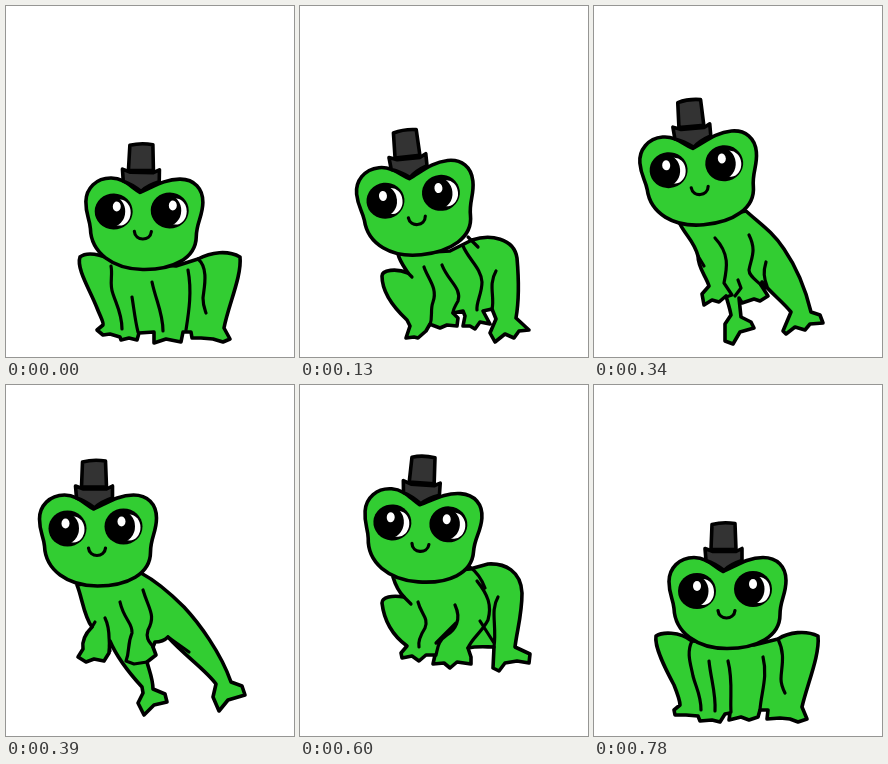
An HTML page that plays this animation: 288 px wide and 351 px high, repeating every 0.91 s.

```html
<!DOCTYPE html>
<html lang="en">
<head>
<meta charset="utf-8">
<title>Hopping frog</title>
<style>
  html, body { margin: 0; width: 100%; height: 100%; overflow: hidden; background: #fff; }
  svg { display: block; width: 288px; height: 351px; }
  path { stroke: #000; stroke-width: 3.6; stroke-linejoin: round; stroke-linecap: round; }
  .skin { fill: #32cd32; }
  .line { fill: none; stroke-width: 3.2; }
  .felt { fill: #333; }
  .glint { transform: translateX(var(--glint, 0px)); }

  /* each pose holds for one seventh of the loop */
  .pose {
    visibility: hidden;
    animation: hold 910ms step-end infinite;
    animation-delay: calc(var(--i) * 130ms - 910ms);
  }
  @keyframes hold {
    0% { visibility: visible; }
    14.2857%, 100% { visibility: hidden; }
  }
</style>
</head>
<body>
<svg viewBox="0 0 288 351">
  <defs>
    <g id="eye">
      <ellipse rx="19" ry="18"/>
      <ellipse cx="6" cy="1" rx="11" ry="13" fill="#fff"/>
      <ellipse cx="-2" rx="13.5" ry="15.5"/>
      <ellipse class="glint" cx="-2" cy="-5" rx="4" ry="5" fill="#fff"/>
    </g>
    <g id="head">
      <path class="skin" stroke-width="4" d="M-4-31C-13-36-20-45-33-45C-48-45-58-34-58-21C-58-8-54-4-53 6C-52 30-30 46 0 46C30 46 53 34 53 12C53-2 59-8 59-22C59-36 50-45 36-45C20-45 8-36-4-31Z"/>
      <path class="felt" d="M-15-78Q-4-81 8-79L9-53H-16Z"/>
      <path class="felt" d="M-22-54L-14-51H9L15-54V-42Q3-38-3-32Q-12-39-21-42Z"/>
      <use href="#eye" x="-30" y="-11.5"/>
      <use href="#eye" x="26" y="-13.5"/>
      <path class="line" d="M-9 8C-8 18 7 18 8 8"/>
    </g>
  </defs>

  <g class="pose" style="--i:0;--glint:5px">
    <path class="skin" d="M108 256C95 247 80 246 74 251C70 262 84 284 91 302C95 312 98 317 97 319L91 324L97 329L104 328L114 331L115 334L123 332L131 334L133 327L148 326L148 337L160 333L175 336L177 326L185 326L186 332L195 332L207 333L217 336L224 333L218 322C222 300 236 270 234 251C222 244 205 246 192 253L170 260Z"/>
    <path class="line" d="M105 260C107 270 103 278 107 288C111 300 116 308 116 323M126 291C128 303 129 314 132 326M146 276C150 295 157 307 157 325M182 264C186 285 183 305 180 324M192 253C203 262 198 282 197 292C197 300 199 304 200 307"/>
    <use href="#head" transform="translate(137.5 217.5) rotate(1)"/>
  </g>

  <g class="pose" style="--i:1">
    <path class="skin" d="M98 248C100 256 105 262 108 267C96 262 82 264 82 270C82 285 92 300 107 314L110 320L106 332L114 331L118 332L126 325L130 318L132 319L140 322L147 319L157 320L158 312L153 307L163 305L165 310L163 320L170 320L175 323L180 316L190 318L183 305L192 303L196 313L190 327L195 336L205 328L214 332L219 325L229 324L216 312C219 295 219 275 217 252C214 232 190 228 172 234L150 245Z"/>
    <path class="line" d="M108 267L112 271M124 261C128 273 138 282 133 296C130 304 133 310 130 319M142 259C148 275 162 282 158 295C155 300 153 304 153 307M163 240C169 254 181 262 182 276C182 288 176 296 177 304M196 265C188 279 195 291 192 303M168 231L178 241"/>
    <use href="#head" transform="translate(116.5 203) rotate(-6)"/>
  </g>

  <g class="pose" style="--i:2">
    <path class="skin" d="M86 218C92 230 100 235 104 250C104 262 112 270 115 280L108 288L110 299L118 294L125 296L132 290C134 297 136 303 137 309L131 318L131 335L139 338L146 326L160 322L157 316L147 311L145 292L148 297L160 293L166 295L174 290L167 279L168 276C178 288 188 295 197 306L189 325L192 328L201 321L211 324L216 318L229 317L226 309L217 306C212 285 203 262 190 243C178 225 165 217 152 205Z"/>
    <path class="line" d="M104 250L110 260M121 232C136 248 133 262 130 277L138 289L132 291M155 229C163 245 157 252 155 264C155 270 162 274 167 279M144 274L147 282L141 290M172 256C169 266 170 272 173 280"/>
    <use href="#head" transform="translate(105.5 173) rotate(-5)"/>
  </g>

  <g class="pose" style="--i:3">
    <path class="skin" d="M71 200C76 212 78 232 86 242C78 250 76 258 77 264L72 272L80 277L88 274L98 276L103 268L104 256C112 275 125 290 136 302L137 308L132 318L138 330L148 320L161 317L159 309L147 304C147 294 143 285 141 277L150 270L147 262L149 257C155 257 160 254 162 252C178 270 200 285 210 299L207 312L213 326L222 315L239 310L236 301L225 297C215 268 193 238 178 222C163 207 150 196 135 188Z"/>
    <path class="line" d="M86 242L89 237M99 233C105 245 102 254 104 266M114 217C118 235 127 238 126 248C121 260 124 266 120 276L128 279L141 277M137 205C143 225 150 230 142 245C139 255 145 258 147 262M162 252L183 267"/>
    <use href="#head" transform="translate(91.5 155)"/>
  </g>

  <g class="pose" style="--i:4">
    <path class="skin" d="M93 192C96 202 99 207 104 212C92 210 82 212 82 218C84 235 92 250 107 261L101 268L102 273L112 271L119 276L126 270L135 270L133 279L144 278L150 283L157 277L171 279L171 272L168 263C177 261 186 262 194 262L193 283L199 286L205 278L217 276L229 278L230 269L215 262C217 245 222 230 222 208C221 186 205 178 188 179L170 184Z"/>
    <path class="line" d="M104 212L111 219M118 217C121 229 129 233 125 243C120 251 118 257 119 262M155 220C162 235 155 245 147 250C138 256 138 262 136 270M177 196C188 210 192 220 188 235C182 247 172 253 168 263M198 212C190 226 197 240 194 262M180 236L194 258M170 182C178 188 182 195 185 203M156 238L136 258"/>
    <use href="#head" transform="translate(121.5 151) rotate(4)"/>
  </g>

  <g class="pose" style="--i:5">
    <path class="skin" d="M102 236C90 228 76 232 75 242C75 255 82 270 85 284L74 289L73 296L83 298L92 296L103 297L108 303L120 303L127 305L138 300L137 291L146 292L142 308L153 311L162 308L174 311L168 291L183 291L181 299L192 300L202 302L214 298L227 294L224 286L216 282C225 268 233 255 231 240C228 222 210 219 196 229C190 232 186 235 184 236L165 212L100 222Z"/>
    <path class="line" d="M100 225C99 236 102 245 102 254C103 268 111 276 111 291L104 297M117 243C113 251 113 257 114 264M134 239C140 256 134 272 137 291M140 246C153 262 148 276 147 292M165 241C174 258 170 274 168 291M184 236C196 248 194 262 189 275C189 282 190 286 183 291M204 246C200 254 199 262 201 269M165 284L180 291"/>
    <use href="#head" transform="translate(128 179.5)"/>
  </g>

  <g class="pose" style="--i:6;--glint:2px">
    <path class="skin" d="M98 256C85 246 68 247 62 251C60 262 72 285 80 300C84 310 86 316 86 320L80 325L81 330L92 330L104 331L106 336L118 335L126 337L131 329L136 328L135 335L147 332L155 335L164 332L166 325L174 325L173 334L186 333L196 334L204 337L213 334L208 322C213 300 226 270 224 251C212 245 195 247 184 254L160 260Z"/>
    <path class="line" d="M98 256C92 268 97 280 99 291C102 303 107 310 107 325M115 276C117 295 122 308 121 326M134 276C139 295 136 311 137 327M169 272C174 292 167 308 166 325M184 254C192 270 187 283 187 294C187 300 189 304 191 308"/>
    <use href="#head" transform="translate(133 217.5)"/>
  </g>
</svg>
</body>
</html>
```
